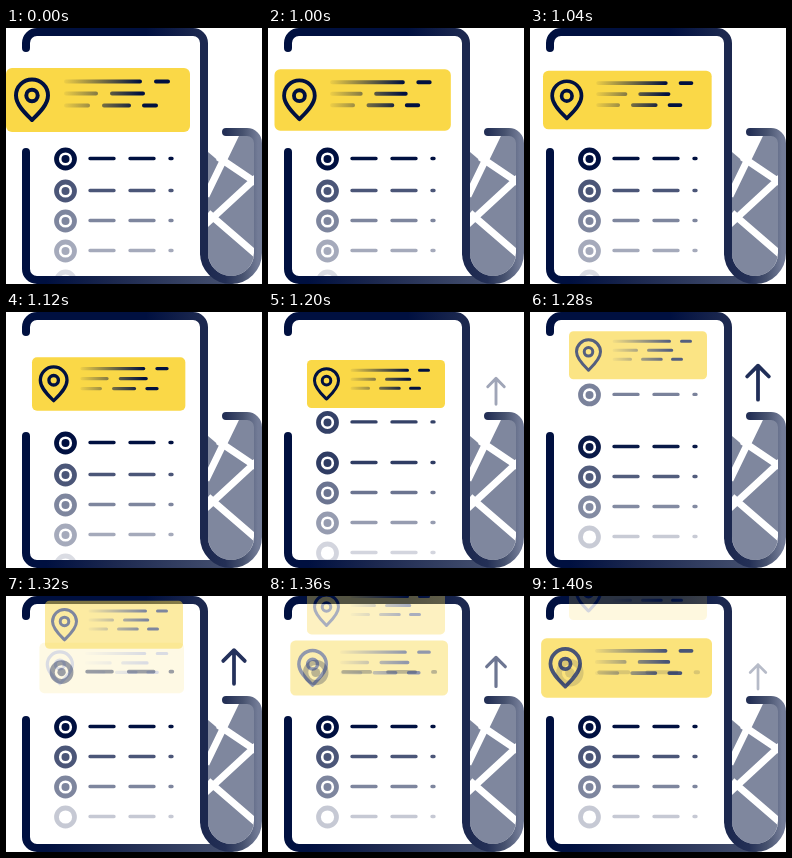
An HTML page for the animation above (1.44 s loop, 256 by 256 pixels).

```html
<!DOCTYPE html>
<html lang="en">
<head>
<meta charset="utf-8">
<title>Route list</title>
<style>
  @property --t { syntax: '<number>'; inherits: true; initial-value: 0; }

  /* The clock advances in 40 ms ticks */
  @keyframes tick { to { --t: 1440; } }

  html { animation: tick 1440ms steps(36) infinite; }
  html, body { margin: 0; width: 100%; height: 100%; overflow: hidden; background: #fff; }

  svg {
    display: block; width: 100vw; height: 100vh;
    --shrink: clamp(0, (var(--t) - 960) / 240, 1);
    --shift: clamp(0, (var(--t) - 1140) / 160, 1);
    --leave: clamp(0, (var(--t) - 1200) / 240, 1);
    --enter: clamp(0, (var(--t) - 1300) / 140, 1);
    --arrow: min(var(--shift), 1 - var(--enter));
  }

  .line { fill: none; stroke: #001040; stroke-linecap: round; stroke-linejoin: round; }

  .old, .new, .first { transform-origin: 156px 72px; }
  .old {
    transform: translateY(calc(var(--leave) * -86.4px)) scale(calc(1 - .25 * var(--shrink)));
    opacity: calc(1 - var(--leave));
  }
  .new {
    transform: scale(calc(.75 + .25 * var(--enter)));
    opacity: var(--enter);
  }
  .first {
    transform: scale(calc(1 + .285 * var(--enter))) translateY(calc(131px - 55px * var(--shift)));
    opacity: calc((1 - .55 * var(--shift)) * (1 - var(--enter)));
  }
  .row {
    transform: translateY(calc(var(--y) * 1px - 32px * var(--shift)));
    opacity: calc(var(--from) + (var(--to) - var(--from)) * var(--shift));
  }
  .arrow {
    transform-origin: 228px 107px;
    transform: scale(calc(.55 + .45 * var(--arrow)));
    opacity: var(--arrow);
  }
</style>
</head>
<body>
<svg viewBox="0 0 256 256">
  <defs>
    <linearGradient id="fade" gradientUnits="userSpaceOnUse" x1="54" y1="0" x2="134" y2="0">
      <stop stop-color="#001040" stop-opacity="0"/>
      <stop offset="1" stop-color="#001040"/>
    </linearGradient>
    <linearGradient id="page" gradientUnits="userSpaceOnUse" x1="140" y1="0" x2="194" y2="0">
      <stop stop-color="#001040"/>
      <stop offset="1" stop-color="#1c284f"/>
    </linearGradient>
    <linearGradient id="base" gradientUnits="userSpaceOnUse" x1="20" y1="0" x2="225" y2="0">
      <stop offset=".1" stop-color="#001040"/>
      <stop offset=".43" stop-color="#1c284f"/>
      <stop offset="1" stop-color="#465170"/>
    </linearGradient>
    <linearGradient id="roll" gradientUnits="userSpaceOnUse" x1="198" y1="0" x2="252" y2="0">
      <stop stop-color="#1c284f"/>
      <stop offset=".4" stop-color="#243056"/>
      <stop offset=".72" stop-color="#47526f"/>
      <stop offset="1" stop-color="#737c97"/>
    </linearGradient>
    <clipPath id="inner">
      <path d="M202 108H248V225A23 23 0 0 1 202 225Z"/>
    </clipPath>

    <g id="ring" class="line">
      <circle cx="59.500" r="9" stroke-width="4.800"/>
      <path d="M84 -.5H108M124 -.5H148M164 -.5H166" stroke-width="3.400"/>
    </g>
    <g id="stop">
      <use href="#ring"/>
      <circle cx="59.500" r="4" fill="#001040"/>
    </g>
    <g id="card">
      <rect y="40" width="184" height="64" rx="6" fill="#fad847"/>
      <g class="line" stroke-width="4">
        <path d="M26 92C20 86 10 77 10 67.500A16 16 0 0 1 42 67.500C42 77 32 86 26 92Z"/>
        <circle cx="26" cy="67.500" r="5.700"/>
        <path d="M60 53.500H134M60 65.500H90M106 65.500H137M60 77.500H82M98 77.500H123" style="stroke:url(#fade)"/>
        <path d="M150 53.500H162M138 77.500H150"/>
      </g>
    </g>
  </defs>

  <g clip-path="url(#inner)">
    <path d="M202 108H248V248H202Z" fill="#7f879e"/>
    <path d="M202 108H228L215 135L202 124Z" fill="#fff"/>
    <path d="M231 104L200 168M212 129L252 156M252 148L198 198M202 185L252 228" fill="none" stroke="#fff" stroke-width="7"/>
  </g>

  <use href="#stop" class="row" style="--y:163;--from:.7;--to:1"/>
  <use href="#stop" class="row" style="--y:193;--from:.5;--to:.7"/>
  <use href="#stop" class="row" style="--y:223;--from:.35;--to:.5"/>
  <use href="#ring" class="row" style="--y:253;--from:.14;--to:.22"/>

  <g class="line" stroke-width="8">
    <path d="M20 124V241A11 11 0 0 0 31 252H225" style="stroke:url(#base)"/>
    <path d="M198 222V225A27 27 0 0 0 252 225V115A11 11 0 0 0 241 104H220" style="stroke:url(#roll)"/>
    <path d="M20 20V15A11 11 0 0 1 31 4H187A11 11 0 0 1 198 15V225" style="stroke:url(#page)"/>
  </g>

  <use href="#card" class="new"/>
  <use href="#stop" class="first"/>
  <use href="#card" class="old"/>

  <path class="line arrow" d="M228 86.500V50.500M216.500 62L228 50.500L239.500 62" stroke-width="4"/>
</svg>
</body>
</html>
```
